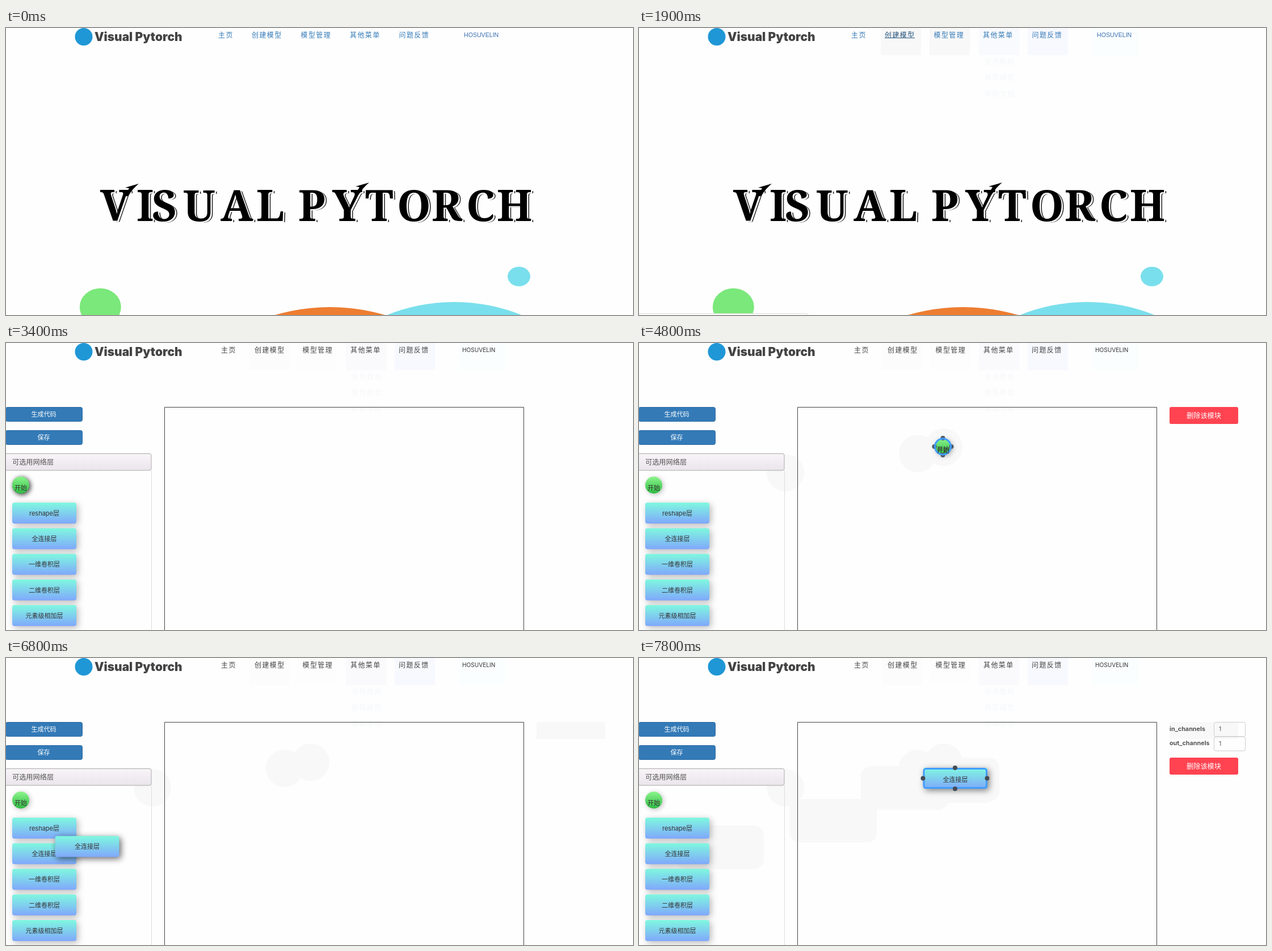
An HTML page with a canvas that plays this animation: 1105 by 507 pixels, repeating every 8 s.

```html
<!DOCTYPE html>
<html lang="zh-CN">
<head>
<meta charset="utf-8">
<title>Visual Pytorch</title>
<style>
html, body { margin: 0; width: 100%; height: 100%; overflow: hidden; background: #fefefe; }
canvas { display: block; }
</style>
</head>
<body>
<canvas id="stage" width="1105" height="507"></canvas>
<script>
const ctx = document.getElementById('stage').getContext('2d');
const W = 1105, H = 507, LOOP = 8000, TAU = Math.PI * 2;
const CJK = '"Noto Sans CJK SC", "Noto Sans CJK", "Noto Sans CJK JP", sans-serif';
const ARIAL = '"Liberation Sans", ' + CJK;
const UI = 'Inter, ' + CJK;
const USER = 'HOSUVELIN';
const BLUE = '#409eff', RED = '#ff4351', TRAIL = '#f8f8f8';

const menu = ['主页', '创建模型', '模型管理', '其他菜单', '问题反馈'];
const homeX = [374, 433, 519.5, 606, 692.5];
const toolX = [379, 438, 522.5, 607, 692];
const layers = ['reshape层', '全连接层', '一维卷积层', '二维卷积层', '元素级相加层'];
const startPath = [[257, 228], [490, 194], [536, 183]];
const layerPath = [[92, 341], [143, 333], [342, 286], [468, 228], [552, 216], [558, 213]];

// left edge of each letter in the big title
const titleX = {
  VISUAL: [166, 230, 257, 312, 378, 441],
  PYTORCH: [515, 575, 633, 689, 750, 811, 865]
};

const clamp = v => Math.max(0, Math.min(1, v));

function text(s, x, y, size, color, o = {}) {
  ctx.font = `${o.weight || 400} ${size}px ${o.font || CJK}`;
  ctx.letterSpacing = (o.space || 0) + 'px';
  ctx.textAlign = o.align || 'left';
  ctx.textBaseline = o.base || 'middle';
  ctx.fillStyle = color;
  ctx.fillText(s, x, y);
  ctx.letterSpacing = '0px';
}

function box(x, y, w, h, r, fill, stroke, line = 1) {
  ctx.beginPath();
  ctx.roundRect(x, y, w, h, r);
  if (fill) { ctx.fillStyle = fill; ctx.fill(); }
  if (stroke) {
    ctx.strokeStyle = stroke;
    ctx.lineWidth = line;
    ctx.stroke();
  }
}

function disc(x, y, rx, fill, ry = rx) {
  ctx.beginPath();
  ctx.ellipse(x, y, rx, ry, 0, 0, TAU);
  ctx.fillStyle = fill;
  ctx.fill();
}

function shade(y0, y1, top, bottom) {
  const g = ctx.createLinearGradient(0, y0, 0, y1);
  g.addColorStop(0, top);
  g.addColorStop(1, bottom);
  return g;
}

function shadow(alpha, blur, shift) {
  ctx.shadowColor = `rgba(0,0,0,${alpha})`;
  ctx.shadowBlur = blur;
  ctx.shadowOffsetX = ctx.shadowOffsetY = shift;
}

function faded(alpha, draw) {
  ctx.save();
  ctx.globalAlpha *= alpha;
  draw();
  ctx.restore();
}

function navBar(t) {
  const home = t < 2400;
  const tints = home
    ? [[426, '#f8f8f8', 1800], [512, '#f8f8f8', 1000], [599, '#f9fafd', 600], [685, '#f8f9fe', 600]]
    : [[428, '#fcfcfc', 0], [512, '#fdfdfd', 0], [599, '#fafafc', 0], [685, '#f8f9fe', 0]];
  for (const [x, color, from] of tints)
    if (t >= from) box(x, 0, 71, 48, 0, color);
  if (t >= 600) box(799, 0, 81, 48, 0, '#fafefe');

  disc(137, 15.5, 15.5, '#1f97d6');
  text('Visual Pytorch', 156, 23, 20.9, '#444', { font: 'Inter, sans-serif', weight: 900, base: 'alphabetic' });

  let hover = -1;
  if (t >= 600 && t < 1000) hover = 3;
  else if (t >= 1000 && t < 1800) hover = 2;
  else if (t >= 1900 && t < 2400) hover = 1;
  menu.forEach((s, i) => {
    const x = (home ? homeX : toolX)[i];
    const on = i === hover;
    text(s, x, 12.5, 12, home ? (on ? '#23527c' : '#337ab7') : '#444', { space: 1.4 });
    if (on) { ctx.fillStyle = '#23527c'; ctx.fillRect(x, 17, 53, 1); }
  });
  if (home) text(USER, 807, 13, 10.6, '#3a6fb0', { font: ARIAL });
  else text(USER, 804, 13, 10.1, '#333', { font: UI });

  if (t >= 600) faded(t < 1000 ? 1 : 0.035, () =>
    ['使用教程', '推荐模型', '帮助文档'].forEach((s, i) =>
      text(s, 609, 59 + i * 28.5, 12, '#337ab7', { space: 1.4, weight: t < 1000 ? 400 : 900 })));
}

function title() {
  for (const [d, color] of [[4, '#222'], [2.6, '#fefefe'], [0, '#000']])
    for (const [word, xs] of Object.entries(titleX))
      xs.forEach((x, i) => text(word[i], x + d, 341 + d * 0.6, 76, color,
        { font: '"Noto Serif", serif', weight: 600, base: 'alphabetic' }));
}

function flare(x, y) {
  ctx.beginPath();
  ctx.moveTo(x, y);
  ctx.lineTo(x - 24, y + 7);
  ctx.lineTo(x - 17, y + 8);
  ctx.lineTo(x - 25, y + 22);
  ctx.lineTo(x - 19, y + 22);
  ctx.quadraticCurveTo(x - 10, y + 8, x, y);
  ctx.fillStyle = '#000';
  ctx.fill();
}

function homePage(t) {
  title();
  flare(234, 275);
  flare(640, 273);
  disc(166.3, 493, 36.5, '#7be87b', 33.3);
  disc(904, 439, 20, '#7adfec', 17.3);
  disc(571, 838, 345, '#ed7d31');
  disc(790, 800, 316, '#7adfec');
  if (t >= 600) box(-4, 504.5, 302, 8, 3, '#fefefe', '#dcdcdc');
}

function startNode(x, y, depth) {
  ctx.save();
  shadow(depth, 9, 2);
  disc(x, y, 15, shade(y - 15, y + 15, '#8cf58c', '#2fbb43'));
  ctx.restore();
  text('开始', x, y + 4.5, 11, '#333', { align: 'center' });
}

function layerNode(s, x, y, depth, drop = 1) {
  ctx.save();
  shadow(depth, 12, 3);
  box(x - 56.5, y - 18.5, 113, 37, 4, shade(y - 18, y + 18, '#7ff7e0', '#80a9fb'));
  ctx.restore();
  text(s, x, y + drop, 11, '#333', { align: 'center', font: UI });
}

function handles(x, y, rx, ry, color) {
  disc(x, y - ry, 4, color);
  disc(x, y + ry, 4, color);
  disc(x - rx, y, 4, color);
  disc(x + rx, y, 4, color);
}

function button(s, y) {
  box(-0.5, y + 0.5, 135, 25, 3, '#337ab7', '#2e6da4');
  text(s, 66.5, y + 12.5, 11, '#fff', { align: 'center', weight: 500 });
}

function deleteButton(y, press = 0) {
  box(935, y, 121, 30, 3, RED);
  text('删除该模块', 995.5, y + 15, 12.2, '#fff', { align: 'center' });
  if (press) faded(press, () => {
    box(935.5, y + 0.5, 120, 29, 3, '#f84b59', '#d9404d');
    text('删除该模块', 995.5, y + 15, 12.2, '#ff2038', { align: 'center' });
  });
}

function trails(t) {
  startPath.forEach(([x, y], i) => {
    if (t >= 3900 + i * 100) disc(x + 1, y + 1, 33, TRAIL);
  });
  layerPath.forEach(([x, y], i) => {
    if (i && t >= 6800 + i * 100) box(x - 77, y - 37, 154, 77, 18, TRAIL);
  });
  if (t >= 5900) box(935, 113, 121, 30, 0, TRAIL);
}

function sidebar(t) {
  button('生成代码', 113);
  button('保存', 154);
  ctx.fillStyle = '#ddd';
  ctx.fillRect(256, 225, 1, H);
  box(-2, 195.5, 258, 29.5, 3, shade(195, 225, '#f8f5f8', '#ebe5ec'), '#aaa');
  text('可选用网络层', 11, 210, 12.2, '#555');
  startNode(26, 251, 0.25);
  layers.forEach((s, i) => {
    const lifted = i === 1 && t >= 6200 && t < 6700;
    layerNode(s, 67.5, 300.5 + i * 45.25, lifted ? 0.4 : 0.28);
  });
}

function startStory(t) {
  if (t >= 3400 && t < 3800) startNode(26, 251, 0.65);
  if (t < 3800 || t >= 5900) return;
  const [x, y] = startPath[Math.min(2, Math.floor((t - 3800) / 100))];
  startNode(x, y, t < 4200 ? 0.6 : t < 4800 ? 0.15 : 0.3);
  if (t >= 4200) handles(535.5, 183, 15, 15, t < 4800 ? '#444' : '#4d5a68');
  if (t >= 4500) {
    ctx.beginPath();
    ctx.arc(535.5, 183, 14, 0, TAU);
    ctx.strokeStyle = BLUE;
    ctx.lineWidth = 3;
    ctx.stroke();
    text('开始', 536, 189.5, 11, '#333', { align: 'center' });
    deleteButton(113, clamp(Math.floor((t - 5500) / 100) / 3));
  }
}

function field(label, y) {
  text(label, 935, y + 12.5, 10.8, '#555', { font: UI, weight: 700 });
  box(1013.5, y + 0.5, 55, 25, 3, null, '#ccc');
  text('1', 1022, y + 13, 10.5, '#555', { font: UI });
}

function layerStory(t) {
  const name = layers[1];
  if (t >= 6500 && t < 6700) layerNode(name, 67.5, 345.75, 0.6);
  if (t < 6700) return;
  if (t < 7300) {
    const [x, y] = layerPath[Math.floor((t - 6700) / 100)];
    layerNode(name, x, y, 0.6);
    return;
  }
  layerNode(name, 557.5, 212.5, 0.5, 3.5);
  if (t >= 7800) box(502, 195.5, 110.5, 34, 4, null, BLUE, 3);
  if (t >= 7400) handles(557, 212.5, 56.5, 18.5, '#444b55');
  if (t < 7800) return;
  field('in_channels', 113);
  field('out_channels', 138.5);
  deleteButton(176);
}

function toolPage(t) {
  trails(t);
  box(279.5, 113.5, 633, 420, 0, null, '#444');
  sidebar(t);
  startStory(t);
  layerStory(t);
}

function draw(t) {
  ctx.fillStyle = '#fefefe';
  ctx.fillRect(0, 0, W, H);
  navBar(t);
  if (t < 2500) faded(t < 2400 ? 1 : 0.4, () => homePage(t));
  else faded(clamp((t - 2400) / 500), () => toolPage(t));
}

const begin = performance.now();
function tick() {
  draw((performance.now() - begin) % LOOP);
  requestAnimationFrame(tick);
}
tick();
</script>
</body>
</html>
```
